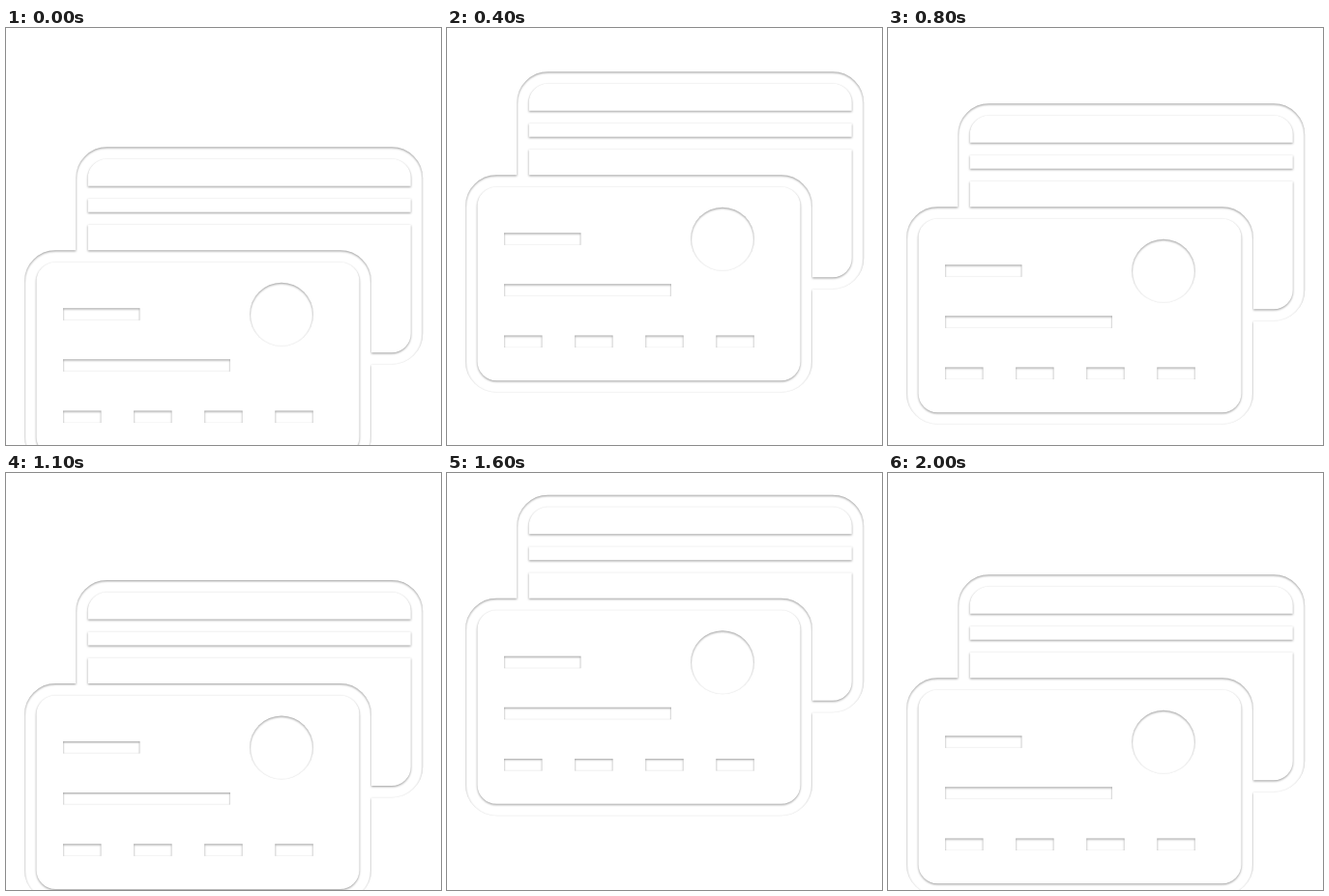
Animation of 450x432 px, one loop 2100 ms. Source, as an HTML page:

```html
<!DOCTYPE html>
<html lang="en">
<head>
<meta charset="utf-8">
<title>Floating cards</title>
<style>
  html, body { margin: 0; width: 100%; height: 100%; overflow: hidden; background: #fff; }
  svg { display: block; width: 450px; height: 432px; }
</style>
</head>
<body>
<svg viewBox="0 0 450 432">
  <defs>
    <!-- Shadow cast into the cut-out shape from its upper edges -->
    <filter id="inset" filterUnits="userSpaceOnUse" x="0" y="-20" width="450" height="380"
            color-interpolation-filters="sRGB">
      <feFlood flood-color="#000" flood-opacity=".4"/>
      <feComposite operator="out" in2="SourceAlpha"/>
      <feGaussianBlur stdDeviation="1.1"/>
      <feOffset dx=".2" dy="1"/>
      <feComposite operator="in" in2="SourceAlpha"/>
    </filter>
    <rect id="card" width="346.5" height="213" rx="26"/>
    <mask id="behind" maskUnits="userSpaceOnUse" x="0" y="-20" width="450" height="380">
      <rect y="-20" width="450" height="380" fill="#fff"/>
      <use href="#card" x="25.25" y="113.25"/>
    </mask>
  </defs>
  <g id="cards">
    <g filter="url(#inset)">
      <g mask="url(#behind)">
        <use href="#card" x="78.5" y="6.25" fill="none" stroke="#000" stroke-width="12.5"/>
        <path d="M78.5 40.5H425V53.5H78.5ZM78.5 67.5H425V80.5H78.5Z"/>
      </g>
      <use href="#card" x="25.25" y="113.25" fill="none" stroke="#000" stroke-width="12.5"/>
      <path d="M59 167h79.5v12.5H59ZM59 220h173v12.5H59Z"/>
      <path d="M59 279.5H318.5" fill="none" stroke="#000" stroke-width="12.5" stroke-dasharray="39.5 33.6"/>
      <circle cx="285" cy="173.5" r="33"/>
    </g>
  </g>
</svg>
<script>
  const LOOP = 2100, STEP = 100;
  const cards = document.getElementById('cards');

  // [time in ms, top of the rear card]
  const keys = [
    [0, 123.3], [400, 45.2], [500, 17.6], [600, 33.6], [800, 78.3], [1000, 115],
    [1100, 111], [1200, 94.3], [1400, 57.2], [1600, 22.8], [1800, 63.5], [2000, 105.3], [LOOP, 123.3]
  ];

  function topAt(time) {
    const next = keys.findIndex(([t]) => t > time);
    const [t0, y0] = keys[next - 1], [t1, y1] = keys[next];
    return y0 + (y1 - y0) * (time - t0) / (t1 - t0);
  }

  function draw(time) {
    const held = Math.floor(time % LOOP / STEP) * STEP;
    cards.setAttribute('transform', `translate(0 ${topAt(held)})`);
  }

  let start;
  function tick(now) {
    start ??= now;
    draw(now - start);
    requestAnimationFrame(tick);
  }
  draw(0);
  requestAnimationFrame(tick);
</script>
</body>
</html>
```
